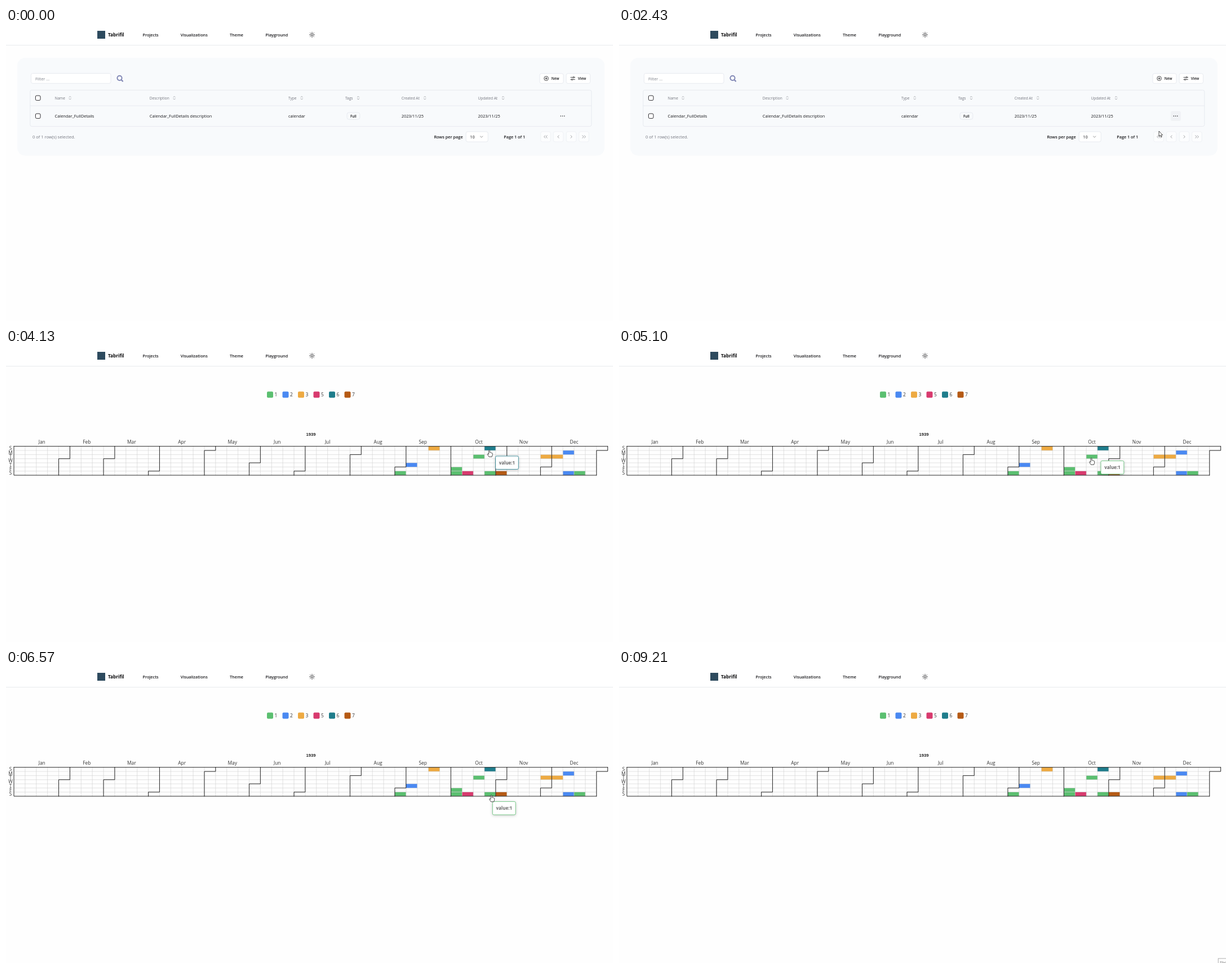
Animation of 1077 by 520 pixels, one loop 9280 ms. Source, as an HTML page:

```html
<!DOCTYPE html>
<html lang="en">
<head>
<meta charset="utf-8">
<title>Calendar visualization</title>
<style>
  html, body { margin: 0; width: 100%; height: 100%; overflow: hidden; background: #fefefe; }
  svg { display: block; width: 1077px; height: 520px; font-family: "Open Sans", "Noto Sans", sans-serif; }
</style>
</head>
<body>
<svg id="stage" viewBox="0 0 1077 520" xmlns="http://www.w3.org/2000/svg"></svg>
<script>
const LOOP = 9280;
const stage = document.getElementById('stage');

function add(parent, tag, attrs, content) {
  const el = document.createElementNS('http://www.w3.org/2000/svg', tag);
  for (const k in attrs) el.setAttribute(k, attrs[k]);
  if (content !== undefined) el.textContent = content;
  parent.appendChild(el);
  return el;
}
const group = parent => add(parent, 'g', {});
const box = (p, x, y, w, h, rx, fill, stroke = 'none', sw = 0.8) =>
  add(p, 'rect', { x, y, width: w, height: h, rx, fill, stroke, 'stroke-width': sw });
const line = (p, d, stroke, sw = 0.8) =>
  add(p, 'path', { d, fill: 'none', stroke, 'stroke-width': sw, 'stroke-linecap': 'round', 'stroke-linejoin': 'round' });
const ring = (p, cx, cy, r, stroke, sw) =>
  add(p, 'circle', { cx, cy, r, fill: 'none', stroke, 'stroke-width': sw });
const label = (p, s, x, y, size, weight = 400, fill = '#18181b', anchor = 'start') =>
  add(p, 'text', { x, y, 'font-size': size, 'font-weight': weight, fill, 'text-anchor': anchor }, s);

const INK = '#18181b', MUTED = '#73757e', EDGE = '#e2e6ec';

// Header
const header = group(stage);
box(header, 0, 0, 1077, 30, 0, '#fff');
box(header, 0, 30, 1077, 0.8, 0, '#e3e6ea');
box(header, 162, 5, 14, 14, 0, '#2d4a5e');
label(header, 'Tabrifil', 181, 15, 8.2, 700, '#09090b');
[['Projects', 256.5], ['Visualizations', 333.7], ['Theme', 409], ['Playground', 480.3]]
  .forEach(([s, x]) => label(header, s, x, 14.7, 7.25, 600, INK, 'middle'));
ring(header, 543, 12, 2, INK, 0.9);
for (let i = 0; i < 8; i++) {
  const c = Math.cos(i * Math.PI / 4), s = Math.sin(i * Math.PI / 4);
  line(header, `M${543 + 3.6 * c},${12 + 3.6 * s}L${543 + 4.6 * c},${12 + 4.6 * s}`, INK, 0.9);
}

// Table page
const table = group(stage);
box(table, 20, 53, 1042, 173.5, 14, '#f8fafc');
box(table, 44.5, 80.5, 141.5, 17.8, 3, '#fff', EDGE);
label(table, 'Filter ...', 52, 92.5, 7.4, 400, '#7c8088');
ring(table, 201.5, 88.8, 4.1, '#8389b6', 2);
line(table, 'M204.8,92.2L207,94.4', '#8389b6', 2.2);

box(table, 947, 80.8, 42, 17.6, 3, '#fff', EDGE);
ring(table, 958.5, 89.5, 3.8, INK, 0.8);
line(table, 'M956.7,89.5h3.6M958.5,87.7v3.6', INK, 0.8);
label(table, 'New', 974.7, 92, 6.45, 600, INK, 'middle');
box(table, 994, 80.8, 42.5, 17.6, 3, '#fff', EDGE);
line(table, 'M1002,87.6h4M1008.4,87.6h1M1002,91.4h1.2M1005.6,91.4h3.8', INK, 0.8);
ring(table, 1007.2, 87.6, 1.2, INK, 0.8);
ring(table, 1004.4, 91.4, 1.2, INK, 0.8);
label(table, 'View', 1022, 92, 6.35, 600, INK, 'middle');

const rowHover = box(table, 43, 138, 996, 36.5, 0, '#f4f7fa');
box(table, 42.8, 110.2, 996, 64.4, 3, 'none', EDGE);
line(table, 'M43,138H1038.6', EDGE);
[124.2, 156.2].forEach(y => box(table, 52.4, y - 4.2, 8.6, 8.4, 2, '#fff', INK, 0.9));

[['Name', 86.5, 113.6], ['Description', 254.8, 298.6], ['Type', 501, 524.7], ['Tags', 602, 625],
 ['Created At', 701.7, 743.2], ['Updated At', 837.5, 882]].forEach(([s, x, sx]) => {
  label(table, s, x, 126.6, 6.55, 500, MUTED);
  line(table, `M${sx - 1.7},123l1.7,-1.7l1.7,1.7m-3.4,2.3l1.7,1.7l1.7,-1.7`, '#85878f', 0.7);
});
[['Calendar_FullDetails', 86.5], ['Calendar_FullDetails description', 254.8], ['calendar', 501],
 ['2023/11/25', 701.7], ['2023/11/25', 837.5]].forEach(([s, x]) => label(table, s, x, 158.9, 7.4));
box(table, 605, 150, 22.8, 12.2, 3.5, '#f8fafc', EDGE);
label(table, 'Full', 616.3, 158.5, 6.2, 600, INK, 'middle');

const dotHover = box(table, 978.8, 147.5, 18, 17.6, 3, '#f0f2f5');
[984.3, 987.5, 990.7].forEach(cx => add(table, 'circle', { cx, cy: 156.2, r: 0.8, fill: INK }));

label(table, '0 of 1 row(s) selected.', 47, 195.6, 7.5, 400, MUTED);
label(table, 'Rows per page', 785, 195.6, 7.3, 600, INK, 'middle');
box(table, 816.2, 184, 39, 18, 3, '#fff', EDGE);
label(table, '10', 823.3, 195.7, 7.4);
line(table, 'M841.4,192l2.2,2.2l2.2,-2.2', '#777', 0.8);
label(table, 'Page 1 of 1', 902.2, 195.6, 7.25, 600, INK, 'middle');
const chevron = (x, dir) => line(table, `M${x - dir},190.7l${2.2 * dir},2.3l${-2.2 * dir},2.3`, '#8b8c90', 0.8);
[[957.5, -1, 2], [980, -1, 1], [1003, 1, 1], [1025.4, 1, 2]].forEach(([x, dir, n]) => {
  box(table, x - 8.8, 184, 17.6, 18, 3, '#fcfdfe', '#eceff3');
  if (n === 1) chevron(x, dir);
  else { chevron(x - 1.7, dir); chevron(x + 1.7, dir); }
});

// Calendar page
const chart = group(stage);
const X0 = 14, Y0 = 172.7, CW = 19.88, CH = 7.33;
const GREEN = '#5bbf70', BLUE = '#4a89f2', ORANGE = '#eeaa42', PINK = '#d83a6e', TEAL = '#1f7d8c', BROWN = '#b55a14';
const colX = c => X0 + c * CW, rowY = r => Y0 + r * CH;

[[1, GREEN], [2, BLUE], [3, ORANGE], [5, PINK], [6, TEAL], [7, BROWN]].forEach(([n, color], i) => {
  const x = 463 + i * 27.5;
  box(chart, x, 75.5, 11, 11, 2, color);
  label(chart, n, x + 13.4, 84.2, 8.4, 400, '#333');
});
label(chart, '1939', 541, 153.8, 7.7, 700, '#222', 'middle')
  .setAttribute('font-family', '"Liberation Sans", Arial, sans-serif');

let grid = '';
for (let c = 1; c < 53; c++) grid += `M${colX(c)},${Y0}V${rowY(7)}`;
for (let r = 1; r < 7; r++) grid += `M${X0},${rowY(r)}H${colX(r === 1 ? 53 : 52)}`;
line(chart, grid, '#cfcfcf', 0.6);

const cells = [
  [34, 6, GREEN], [35, 4, BLUE], [37, 0, ORANGE], [39, 5, GREEN], [39, 6, GREEN], [40, 6, PINK],
  [41, 2, GREEN], [42, 0, TEAL], [42, 6, GREEN], [43, 6, BROWN], [47, 2, ORANGE], [48, 2, ORANGE],
  [49, 1, BLUE], [49, 6, BLUE], [50, 6, GREEN]
];
cells.forEach(([c, r, color]) => box(chart, colX(c), rowY(r), CW, CH, 0, color, '#cfcfcf', 0.5));

let edges = `M${X0},${Y0}H${colX(53)}M${X0},${Y0}V${rowY(7)}H${colX(52)}`;
let day = 0;
'Jan Feb Mar Apr May Jun Jul Aug Sep Oct Nov Dec'.split(' ').forEach((name, m) => {
  const first = Math.floor(day / 7);
  day += new Date(1939, m + 1, 0).getDate();
  const mid = (first + Math.floor((day - 1) / 7) + 1) / 2;
  label(chart, name, colX(mid), 168, 8.4, 400, '#333', 'middle');
  const c = Math.floor(day / 7), r = day % 7;
  edges += r ? `M${colX(c + 1)},${Y0}V${rowY(r)}H${colX(c)}V${rowY(7)}` : `M${colX(c)},${Y0}V${rowY(7)}`;
});
line(chart, edges, '#111', 0.9);
[...'SMTWTFS'].forEach((s, r) => label(chart, s, 8, rowY(r + 0.5) + 2.9, 8.2, 400, '#333', 'middle'));

// Value tooltip
const tip = group(stage);
tip.style.filter = 'drop-shadow(0.6px 1px 2.5px rgba(0,0,0,.22))';
const tipBox = box(tip, 0, 0, 40.8, 23.5, 2.2, '#fff', GREEN, 0.8);
label(tip, 'value:1', 20.4, 14.6, 7.95, 700, '#666', 'middle');

// Corner hint
const hint = group(stage);
box(hint, 1063.2, 512, 60, 20, 0, '#fff', '#9a9a9a', 0.8);
const hintText = label(hint, 'Show desktop', 1066.3, 522, 6.6, 400, '#666');

// Pointer
const pointer = group(stage);
const shape = d => add(pointer, 'path', { d, fill: '#fff', stroke: '#111', 'stroke-width': 0.75, 'stroke-linejoin': 'round' });
const arrow = shape('M0,0V9.3L2.2,7.4L3.8,10.9L5.3,10.2L3.8,6.9H6.6Z');
const hand = shape('M-1,1Q-1,0 0,0Q1,0 1,1V4.2Q2,3.7 2.6,4.5Q3.6,4.1 4.1,5Q5.6,4.8 5.6,6.2V8.6L4.6,11.8H-.6L-3.2,7.9Q-3.7,6.5 -2.5,6.4L-1,7.6Z');

const path = [
  [70, 1046, 515], [400, 1016, 300], [750, 994, 156], [910, 994, 156], [1080, 988, 153], [1540, 988, 153],
  [2030, 958, 183], [3110, 958, 183], [3350, 898, 164], [3590, 858, 174], [3920, 858, 174], [4100, 857.5, 179.5],
  [4540, 857.5, 179.5], [5050, 838, 193.5], [5510, 838, 193.5], [5980, 812, 218.5], [6200, 813, 221],
  [6420, 856, 222], [6600, 862, 222], [6800, 879.5, 221], [7060, 880, 221], [7200, 922, 295.5],
  [7360, 957.5, 379.5], [7420, 957.5, 379.5], [7790, 1049, 500]
];
const tipPath = [
  [3920, 869, 185], [4130, 868.5, 190], [4700, 868.5, 190], [5100, 855, 198.5], [5400, 849, 204.5],
  [5620, 849, 204.5], [6000, 828.5, 225], [6200, 823.5, 231], [6290, 826, 233], [6420, 852, 234],
  [6700, 873, 233], [6950, 890.5, 232]
];
const tipColors = [[0, TEAL], [4850, GREEN], [5880, PINK], [6370, GREEN], [6750, BROWN]];

const clamp = v => Math.max(0, Math.min(1, v));
const ramp = (t, a, b) => clamp((t - a) / (b - a));
function along(keys, t) {
  let i = 0;
  while (i < keys.length - 2 && t >= keys[i + 1][0]) i++;
  const [ta, xa, ya] = keys[i], [tb, xb, yb] = keys[i + 1];
  const k = ramp(t, ta, tb);
  return [xa + (xb - xa) * k, ya + (yb - ya) * k];
}
const show = (el, on) => el.setAttribute('visibility', on ? 'visible' : 'hidden');
const move = (el, [x, y]) => el.setAttribute('transform', `translate(${x.toFixed(2)} ${y.toFixed(2)})`);

function draw(t) {
  const onTable = t < 2760;
  const [x, y] = along(path, t);
  const visible = t >= 70 && t < 7810;
  table.style.display = onTable ? '' : 'none';
  chart.style.display = onTable ? 'none' : '';

  show(rowHover, onTable && visible && y > 138 && y < 174.5);
  show(dotHover, t >= 700 && onTable);

  const onDots = onTable && x > 979 && x < 997 && y > 147 && y < 165;
  const onCell = !onTable && cells.some(([c, r]) =>
    x >= colX(c) && x <= colX(c + 1) && y >= rowY(r) && y <= rowY(r + 1));
  pointer.style.display = visible ? '' : 'none';
  show(hand, onDots || onCell);
  show(arrow, !(onDots || onCell));
  move(pointer, [x, y]);

  tip.style.opacity = ramp(t, 3900, 4080) * (1 - ramp(t, 7220, 7360));
  tipBox.setAttribute('stroke', tipColors.filter(k => t >= k[0]).pop()[1]);
  move(tip, along(tipPath, t));

  hint.style.opacity = ramp(t, 8840, 9010);
  hintText.setAttribute('fill', t < 9210 ? '#707070' : '#606060');
}

const start = performance.now();
function frame() {
  draw((performance.now() - start) % LOOP);
  requestAnimationFrame(frame);
}
draw(0);
requestAnimationFrame(frame);
</script>
</body>
</html>
```
